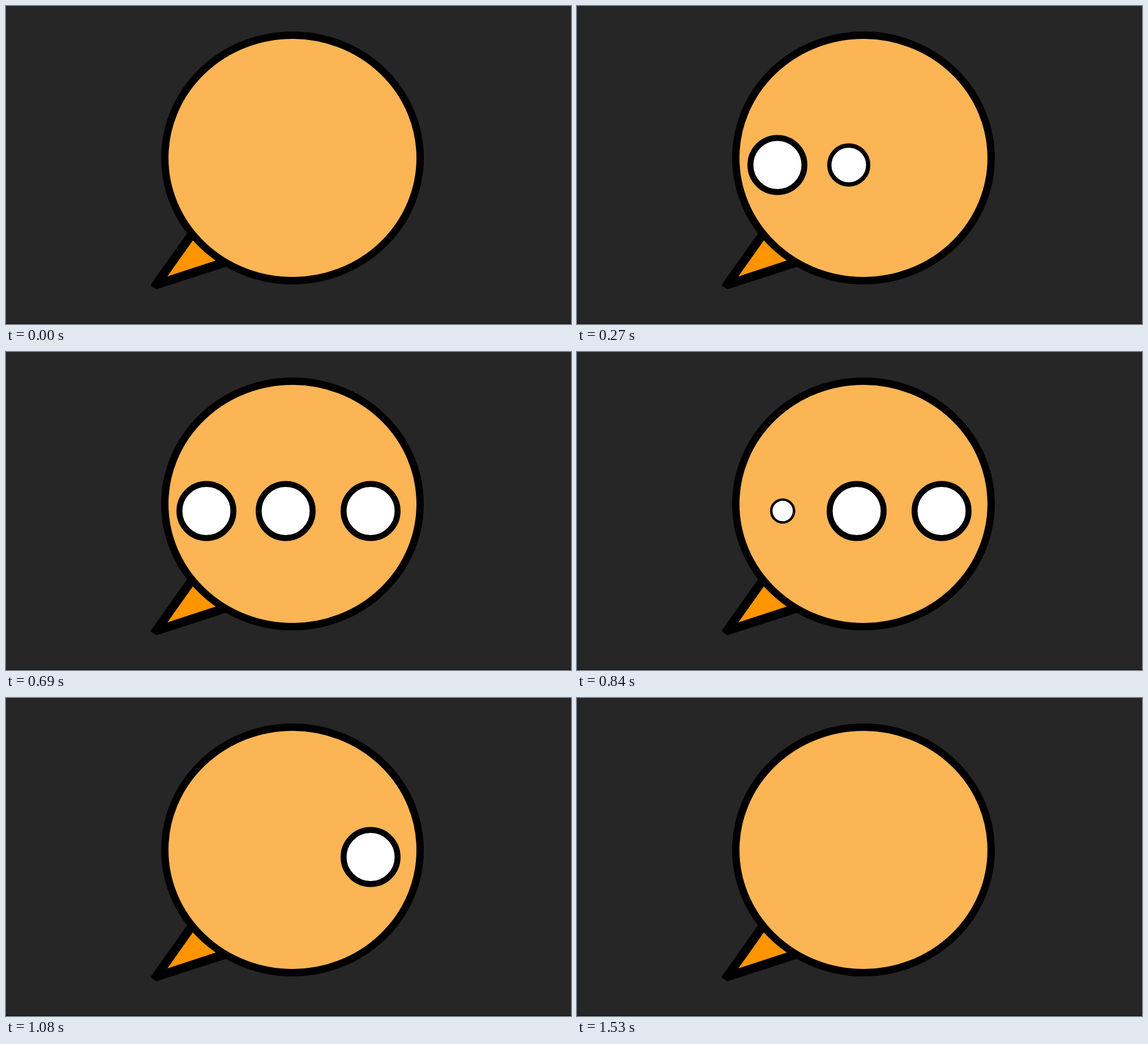
Recreate the animation shown at these times as an HTML page. Size 998 px wide and 561 px high, loop 1560 ms.

```html
<!DOCTYPE html>
<html lang="en">
<head>
<meta charset="utf-8">
<title>Typing bubble</title>
<style>
  html, body { margin: 0; height: 100%; overflow: hidden; background: #262626; }
  svg { display: block; width: 100%; height: 100%; }
</style>
</head>
<body>
<svg viewBox="0 0 998 561">
  <rect width="998" height="561" fill="#262626"/>
  <rect y="560" width="998" height="1" fill="#111"/>
  <path d="M322 398 256 491Q255 493 257 494L264 499Q266 500 268 499L392 459Z"/>
  <path d="M340 399.500 285 477 386 444Z" fill="#ff9500"/>
  <ellipse cx="506" cy="268" rx="225.500" ry="216.500" fill="#fcb555" stroke="#000" stroke-width="13"/>
  <g id="dots" fill="#fff" stroke="#000" stroke-width="10.500"></g>
</svg>
<script>
  const LOOP = 1560, STAGGER = LOOP / 8, DURATION = 105.5;
  const GROW_ANCHOR = -50, SHRINK_ANCHOR = 16;
  const group = document.getElementById('dots');

  const dots = [354, 494, 644].map((x, i) => {
    const node = document.createElementNS('http://www.w3.org/2000/svg', 'circle');
    node.setAttribute('r', 47.7);
    group.append(node);
    return { node, x, start: i * STAGGER };
  });

  const progress = (time, start) => Math.min(1, Math.max(0, (time - start) / DURATION));

  function draw(now) {
    const time = now % LOOP;
    for (const { node, x, start } of dots) {
      const shrink = progress(time, start + LOOP / 2);
      const scale = progress(time, start) - shrink;
      const anchor = shrink > 0 ? SHRINK_ANCHOR : GROW_ANCHOR;
      node.setAttribute('transform', `translate(${x + anchor * (1 - scale)} 280.5) scale(${scale})`);
      node.setAttribute('visibility', scale > 0 ? 'visible' : 'hidden');
    }
  }

  const origin = performance.now();
  function tick() {
    draw(performance.now() - origin);
    requestAnimationFrame(tick);
  }
  tick();
</script>
</body>
</html>
```
